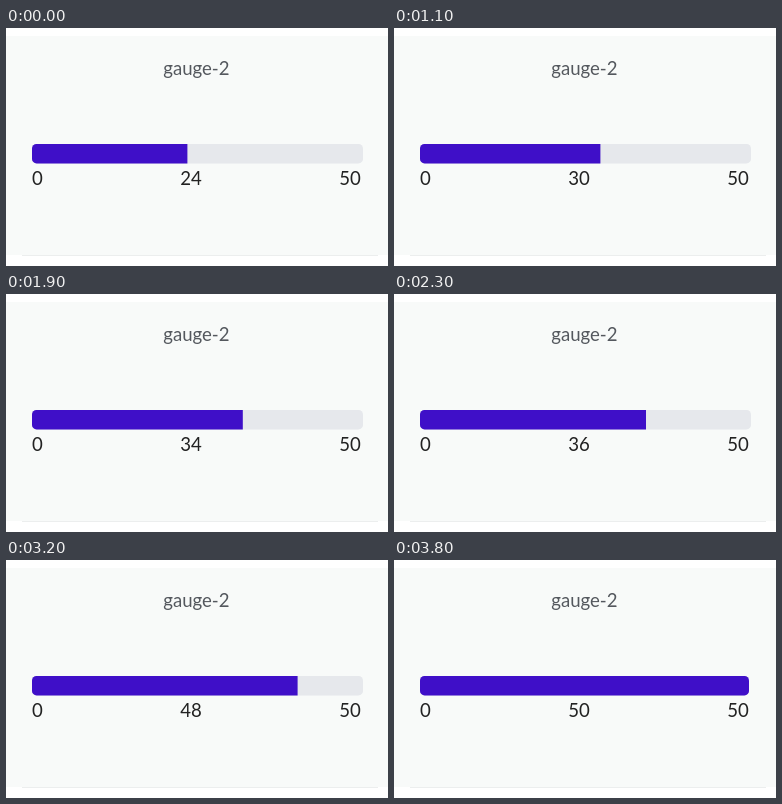
An HTML page for the animation above (4600 ms loop, 382 by 238 pixels).

```html
<!DOCTYPE html>
<html lang="en">
<head>
<meta charset="utf-8">
<title>Gauge</title>
<style>
  html, body { margin: 0; height: 100%; overflow: hidden; background: #fff; }
  svg { display: block; width: 382px; height: 238px; }
  text { font: 18.6px Lato, "Open Sans", sans-serif; fill: #222; }
  .title { fill: #54585e; }
</style>
</head>
<body>
<svg viewBox="0 0 382 238">
  <clipPath id="shape"><rect id="outline" x="26" y="116" width="331" height="19.4" rx="4.5"/></clipPath>
  <rect y="8" width="382" height="219" fill="#f8faf9"/>
  <rect x="16" y="227" width="356" height="1" fill="#eceeee"/>
  <text class="title" x="190.4" y="46.5" text-anchor="middle">gauge-2</text>
  <g clip-path="url(#shape)">
    <rect x="26" y="116" width="331" height="20" fill="#e6e8ec"/>
    <rect id="fill" x="26" y="116" height="20" fill="#3f0fc8"/>
  </g>
  <text x="26" y="157.4">0</text>
  <text id="value" x="185" y="157.4" text-anchor="middle"></text>
  <text x="354.8" y="157.4" text-anchor="end">50</text>
</svg>
<script>
const LOOP = 4600, STEP = 100;
const LEFT = 26, TRACK_END = 357, FILL_END = 355;
const FASTER = 23, CATCH_UP = 32, DONE = 38; // step numbers
const $ = id => document.getElementById(id);
const since = (n, from) => Math.max(0, n - from);

// Steady count that accelerates towards the maximum
function counter(n) {
  return Math.min(50, Math.floor(24.5 + n / 2 + 0.102 * since(n, FASTER) ** 2));
}

// The bar trails the counter, then eases out to the end
function edge(n) {
  const m = Math.min(n, CATCH_UP);
  const trailing = 181.4 + 1.4 * m + 2.4 * since(m, 7) + 0.6 * since(m, FASTER);
  const p = Math.min(1, since(n, CATCH_UP) / (DONE - CATCH_UP));
  return trailing + (FILL_END - trailing) * (1 - (1 - p) ** 2);
}

function draw(time) {
  const n = Math.floor(time % LOOP / STEP);
  $('value').textContent = counter(n);
  $('fill').setAttribute('width', edge(n) - LEFT);
  $('outline').setAttribute('width', (n < DONE ? TRACK_END : FILL_END) - LEFT);
}

const start = performance.now();
function tick() {
  draw(performance.now() - start);
  requestAnimationFrame(tick);
}
tick();
</script>
</body>
</html>
```
